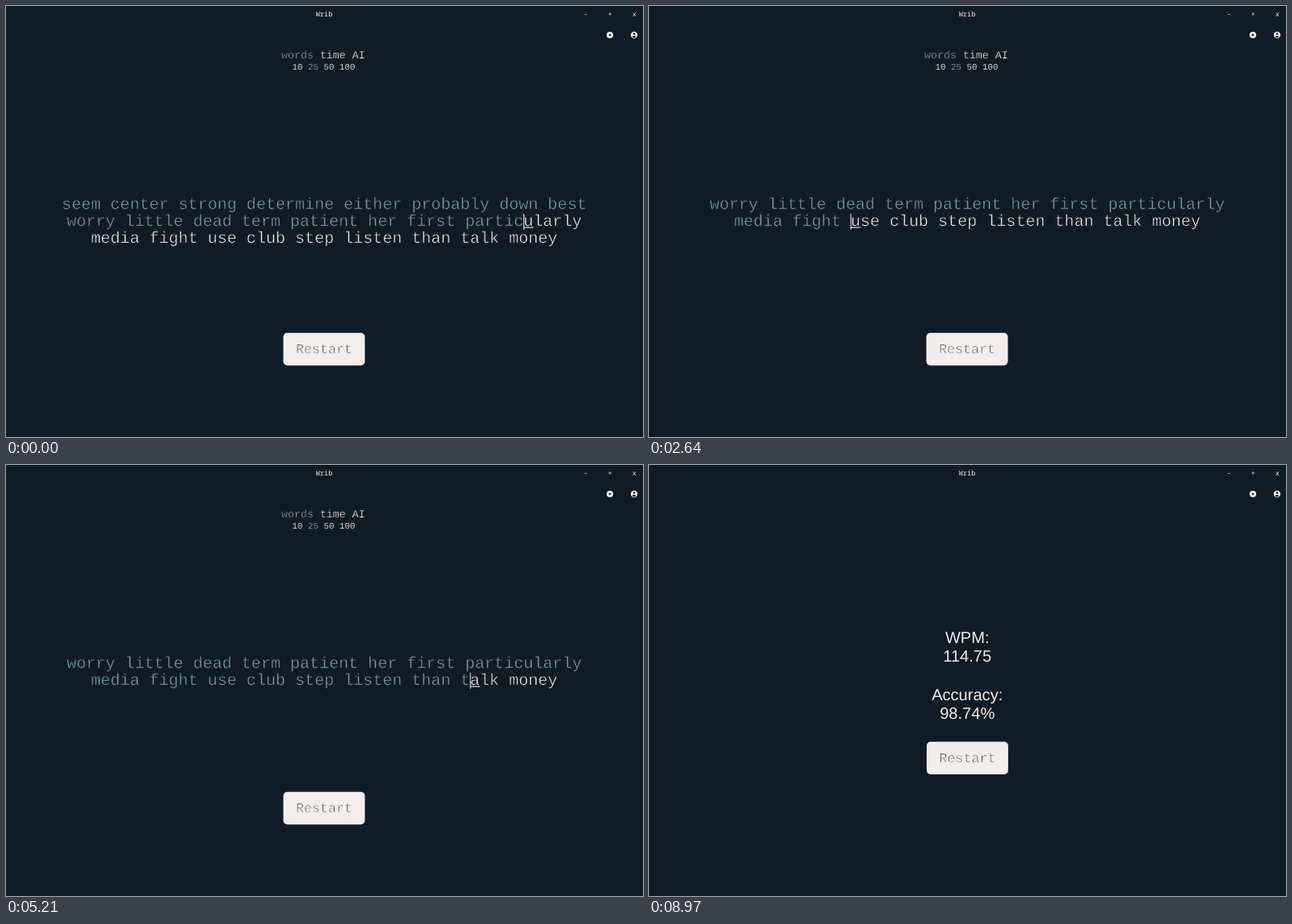
An HTML page for the animation above (9000 ms loop, 789 by 535 pixels).

```html
<!DOCTYPE html>
<html lang="en">
<head>
<meta charset="utf-8">
<title>Typing test</title>
<style>
  html, body { margin: 0; width: 100%; height: 100%; overflow: hidden; background: #101c25; }
  svg { display: block; width: 789px; height: 535px; }
  text { fill: #f1ece8; white-space: pre; text-rendering: geometricPrecision; }
  /* a stroke in the backdrop colour thins the letters */
  .mono { font-family: "Courier New", "Liberation Mono", monospace; stroke: #101c25; stroke-width: 0.45px; }
  .bar { font: 8.6px "Noto Sans Mono", "DejaVu Sans Mono", monospace; text-anchor: middle; }
  .line { font-size: 20.07px; }
  .mode { font-size: 13.3px; stroke-width: 0.25px; }
  .count { font-size: 10.8px; stroke-width: 0.1px; }
  .score { font: 20.07px Arial, "Liberation Sans", sans-serif; text-anchor: middle; }
  .button { fill: #3a4347; stroke: #f2eeec; stroke-width: 0.7px; font-size: 16.7px; text-anchor: middle; }
  .done { fill: #7ba1a5; }
  .light { fill: #f2eeec; stroke: none; }
  .dark { fill: #101c25; }
</style>
</head>
<body>
<svg viewBox="0 0 789 535">
  <g class="bar">
    <text x="394" y="12.8">Wrib</text>
    <text x="718" y="12.8">-</text>
    <text x="748" y="12.8">+</text>
    <text x="778.3" y="12.8">x</text>
  </g>
  <circle class="light" cx="748" cy="36" r="4.1"/>
  <circle class="dark" cx="748" cy="36" r="1.3"/>
  <circle class="light" cx="778" cy="36" r="4.2"/>
  <circle class="dark" cx="778" cy="34.6" r="1.25"/>
  <path class="dark" d="M775.5 38.4Q778 35.6 780.5 38.4Q778 40.4 775.5 38.4Z"/>

  <g id="test">
    <text class="mono mode" x="341" y="65"><tspan class="done">words</tspan> time AI</text>
    <text class="mono count" x="354.6" y="79.3">10 <tspan class="done">25</tspan> 50 100</text>
    <g id="lines" class="mono line"></g>
    <rect id="under" class="light" y="274.4" height="1.1"/>
    <rect id="caret" class="light" y="257.8" width="1" height="20"/>
  </g>

  <g id="result" class="score">
    <text x="394.2" y="221">WPM:</text>
    <text x="394.2" y="244">114.75</text>
    <text x="394.2" y="292">Accuracy:</text>
    <text x="394.2" y="315">98.74%</text>
  </g>

  <g id="restart">
    <rect class="light" x="343.5" y="405.7" width="101" height="40.5" rx="5"/>
    <text class="mono button" x="394" y="431">Restart</text>
  </g>
</svg>
<script>
const LOOP = 9000, FINISH = 6640;
const ADVANCE = 12.044, CENTER = 394.3, ROW = 21, BASE = 252;
const LINES = [
  "seem center strong determine either probably down best",
  "worry little dead term patient her first particularly",
  "media fight use club step listen than talk money"
];

// Key strokes: line, first and last caret column, time of each (ms)
const STROKES = [
  [1, 47, 47, 0, 0],
  [1, 48, 48, 30, 30],
  [1, 49, 52, 550, 730],
  [1, 53, 53, 940, 940],
  [2, 0, 0, 1030, 1030],
  [2, 1, 4, 1480, 1790],
  [2, 5, 10, 1910, 2300],
  [2, 11, 11, 2420, 2420],
  [2, 12, 16, 2580, 3030],
  [2, 17, 26, 3210, 4060],
  [2, 27, 31, 4180, 4520],
  [2, 32, 37, 4605, 5030],
  [2, 38, 47, 5090, 5960]
];

const $ = id => document.getElementById(id);
const SVG = "http://www.w3.org/2000/svg";
const make = (tag, parent) => parent.appendChild(document.createElementNS(SVG, tag));
const startX = text => CENTER - text.length * ADVANCE / 2;
const show = (id, on) => $(id).setAttribute("display", on ? "inline" : "none");

const rows = LINES.map(text => {
  const node = make("text", $("lines"));
  node.setAttribute("x", startX(text));
  const done = make("tspan", node);
  done.setAttribute("class", "done");
  return { text, node, done, rest: make("tspan", node) };
});

function cursorAt(t) {
  const [line, from, to, t0, t1] = STROKES.filter(s => s[3] <= t).pop();
  if (from === to) return { line, col: from };
  const part = Math.min(1, (t - t0) / (t1 - t0));
  return { line, col: from + Math.floor(part * (to - from) + 1e-6) };
}

function drawTest({ line, col }) {
  rows.forEach((row, i) => {
    const typed = i < line ? row.text.length : i === line ? col : 0;
    row.done.textContent = row.text.slice(0, typed);
    row.rest.textContent = row.text.slice(typed);
    row.node.setAttribute("y", BASE + (i - line + 1) * ROW);
    row.node.setAttribute("display", i < line - 1 ? "none" : "inline");
  });
  const text = LINES[line], x = startX(text) + col * ADVANCE;
  const onLetter = col < text.length && text[col] !== " ";
  $("caret").setAttribute("x", x - 0.3);
  $("under").setAttribute("x", x);
  $("under").setAttribute("width", onLetter ? ADVANCE : 0);
}

let last = "";
function draw(t) {
  const ended = t >= FINISH;
  const cursor = cursorAt(t);
  const state = [ended, cursor.line, cursor.col].join();
  if (state === last) return;
  last = state;
  show("test", !ended);
  show("result", ended);
  $("restart").setAttribute("transform", ended ? "translate(0.4 -62.2)" : "");
  if (!ended) drawTest(cursor);
}

const begin = performance.now();
function tick() {
  draw((performance.now() - begin) % LOOP);
  requestAnimationFrame(tick);
}
draw(0);
tick();
</script>
</body>
</html>
```
